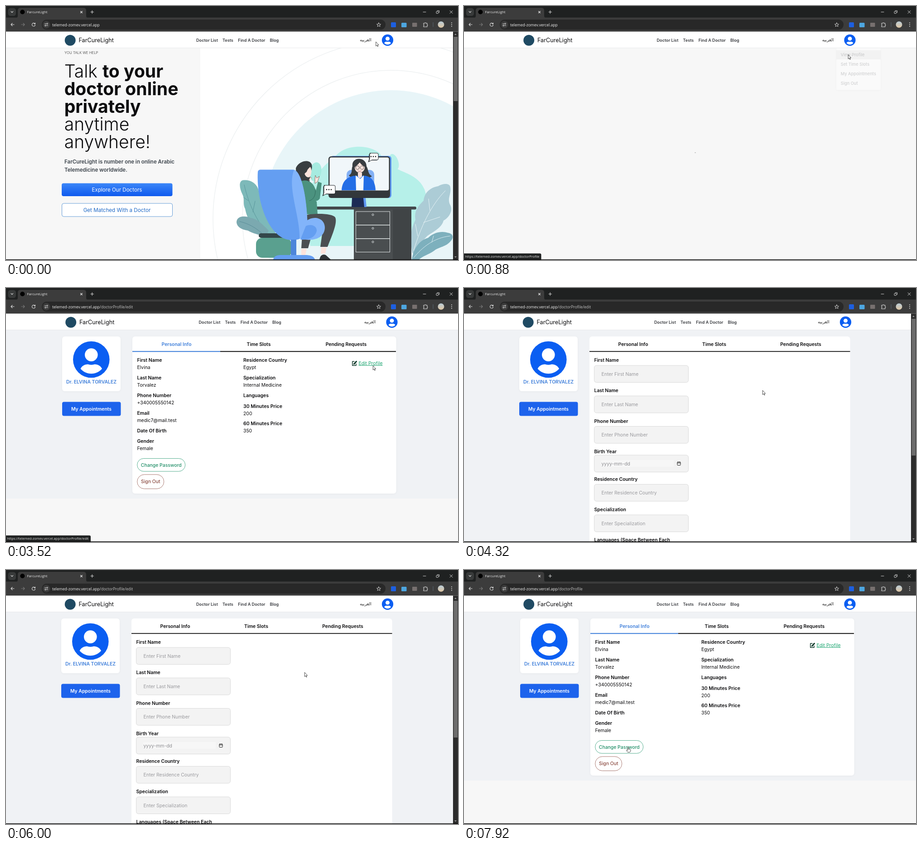
Recreate the animation shown at these times as an HTML page. Size 998x561 px, loop 8000 ms.

```html
<!DOCTYPE html>
<html lang="en">
<head>
<meta charset="utf-8">
<title>Telemedicine walkthrough</title>
<style>
  html, body { margin: 0; width: 100%; height: 100%; overflow: hidden; background: #f7f7f7; }
  svg { display: block; width: 100vw; height: 100vh; }
  text { font-family: Inter, sans-serif; white-space: pre; }
  .ui { font-family: "Open Sans", "Noto Sans", sans-serif; }
  .ar { font-family: "DejaVu Sans", sans-serif; }
</style>
</head>
<body>
<svg id="stage" viewBox="0 0 998 561" xmlns="http://www.w3.org/2000/svg"></svg>
<script>
const LOOP = 8000, STEP = 80;
const BRAND = 'FarCureLight', HOST = 'telemed-zomev.vercel.app';
const BLUE = '#0a5ef2', LINK = '#3f7fda', INK = '#0c0c0e';

const text = (x, y, size, str, weight = 400, fill = INK, extra = '') =>
  `<text x="${x}" y="${y}" font-size="${size}" font-weight="${weight}" fill="${fill}" ${extra}>${str}</text>`;
const mid = (x, y, size, str, weight, fill) => text(x, y, size, str, weight, fill, 'text-anchor="middle"');
const rect = (x, y, w, h, fill, rx = 0, extra = '') =>
  `<rect x="${x}" y="${y}" width="${w}" height="${h}" rx="${rx}" fill="${fill}" ${extra}/>`;
const circle = (x, y, r, fill, extra = '') => `<circle cx="${x}" cy="${y}" r="${r}" fill="${fill}" ${extra}/>`;
const path = (d, fill, extra = '') => `<path d="${d}" fill="${fill}" ${extra}/>`;
const line = (d, stroke, width = 1, extra = '') =>
  path(d, 'none', `stroke="${stroke}" stroke-width="${width}" stroke-linecap="round" stroke-linejoin="round" ${extra}`);
const group = (id, body) => `<g id="${id}">${body}</g>`;

const person = (x, y, r) => `<g transform="translate(${x} ${y}) scale(${r / 248})">
  ${circle(0, 0, 248, BLUE)}${circle(0, -64, 88, '#fff')}
  ${path('M0 192C-59 192-111 165-146 124C-128 88-91 64-48 64C-33 64-24 72 0 72S33 64 48 64C91 64 128 88 146 124C111 165 59 192 0 192Z', '#fff')}</g>`;

function illustration() {
  const HAIR = '#393e41', SKIN = '#fbe3dc', SEAT = '#649ef1', SEAT_LIGHT = '#82b4fa';
  const ring = r => circle(850, 470, r, 'none', 'stroke="#eef1f2" stroke-width="1.5"');
  const leaf = (d, vein, fill, stroke) => path(d, fill) + line(vein, stroke, 1);
  const bubble = (x, y, w, h) => {
    const shape = `M${x + 3} ${y}h${w - 6}q3 0 3 3v${h - 6}q0 3-3 3h-${w - 11}l-7 4 2-6v-${h - 4}q0-1 2-1z`;
    return path(shape, '#1e2226', 'transform="translate(-1.5 1)"') + path(shape, '#fff', 'stroke="#1e2226"') +
      [-5, 0, 5].map(d => circle(x + w / 2 + d, y + h / 2, 1.3, '#111')).join('');
  };
  const drawers = [0, 1, 2].map(i =>
    rect(772.5, 454 + i * 30, 75, 29.5, 'none', 0, 'stroke="#dfe5e6"') +
    circle(810, 461 + i * 30, 2, 'none', 'stroke="#dfe5e6"')).join('');
  return [
    ring(393), ring(328), circle(850, 470, 284, '#e8f5f8'),
    path('M672 530C650 450 665 375 725 335C745 305 800 304 825 325C850 372 905 360 924 405C940 455 930 505 912 530Z', '#b6f0e9'),
    '<ellipse cx="857" cy="344" rx="9" ry="18" fill="#b6f0e9" transform="rotate(-20 857 344)"/>',
    '<ellipse cx="683" cy="366" rx="13" ry="21" fill="#a6ebe0" transform="rotate(12 683 366)"/>',
    // plants
    leaf('M570 510C545 490 532 470 528 448C522 436 528 428 522 416C515 402 514 388 522 385C540 382 555 393 558 408C568 420 580 450 596 470L594 512Z',
      'M526 395C536 440 555 475 575 500M535 430l-10-7M545 455l5-24', '#7db9b9', '#5a979c'),
    leaf('M509 478C509 464 526 462 540 468C555 470 566 482 580 496L574 508C558 506 545 502 534 496C520 494 510 488 509 478Z',
      'M516 476C535 480 552 490 566 503', '#7ba9b0', '#5a8d98'),
    leaf('M897 545C890 505 896 490 904 472C900 452 912 440 922 430C924 410 940 400 954 398C966 391 980 391 981 400C984 414 974 424 980 438C988 450 980 466 966 474C962 490 944 498 930 508C918 520 908 535 900 548Z',
      'M970 408C938 440 915 490 900 540M936 452l-3-26M922 478l36-12M909 508l-5-26', '#acccd6', '#e6f3f6'),
    leaf('M896 560C900 535 912 518 932 512C944 500 962 496 976 501C988 503 989 512 982 519C972 532 956 532 946 540C932 550 920 552 912 560Z',
      'M980 508C945 512 920 532 900 556M940 522l4-14', '#7db0bd', '#d9ebf0'),
    // desk
    rect(768, 449, 127, 111, '#4a4e50'), rect(854, 449, 41, 111, '#404446'), drawers,
    rect(655, 443, 251, 6.5, '#42474a', 3),
    // monitor
    rect(716, 331, 135, 93, '#5d96f2', 6), path('M764 424h29l2 20h-32z', '#1c2b54'), path('M789 424h5l2 20h-5z', '#5d96f2'),
    rect(712, 332, 136, 92, '#33383b', 6), rect(714.5, 334.5, 131, 73, '#f1f7fa', 4),
    rect(752, 362, 61, 45, '#83b0f4', 10),
    path('M765 354C762 332 796 332 796 354C801 362 798 370 808 376C798 384 762 383 757 374C766 370 762 360 765 354Z', HAIR),
    circle(781, 357, 11, SKIN), path('M769 357C768 341 793 341 793 356C788 353 783 349 781 345C778 350 773 353 769 357Z', HAIR),
    line('M772 357a4 4 0 1 0 8 0a4 4 0 1 0-8 0M782 357a4 4 0 1 0 8 0a4 4 0 1 0-8 0', HAIR, .8),
    line('M777 364q4 3 7 0', '#b06a68'),
    path('M741 407C742 386 754 378 768 375L794 375C808 378 815 388 816 407Z', '#246ee6'),
    path('M772 374L782 382L790 374L789 407L773 407Z', '#f6faff'), path('M777 368h9v9l-5 4-4-4z', SKIN),
    // patient
    path('M640 358C645 343 670 336 675 350C678 362 670 368 671 380C670 400 660 415 648 412C652 396 640 380 640 358Z', HAIR),
    path('M664 354C674 350 677 364 672 376C668 382 658 376 659 366Z', SKIN),
    path('M650 357C655 347 673 343 675 351C671 358 667 357 664 366L653 376Z', HAIR),
    path('M668 386l4-9 3 4M682 382l1-8 3 6 6-4-4 12-6 4z', SKIN, 'stroke="#6b4a45" stroke-width=".7"'),
    path('M648 388C666 380 680 390 684 408L689 388L697 391L693 425C688 433 681 429 686 432L688 460H655Z', '#4b927f'),
    line('M683 405C684 420 678 428 670 430', '#316b5d'),
    path('M645 470C650 457 720 455 727 467C733 480 716 515 710 532H694L701 483L680 488L667 535H652L655 490Z', '#4b4f52'),
    path('M652 536h12l-3 14h-9zM696 533h12l-3 14h-10z', SKIN), path('M645 560q4-12 20-8l5 8zM692 560q3-14 14-10l11 10z', '#303538'),
    // chair
    rect(558, 502, 72, 10, '#34474a', 5), rect(552, 512, 78, 44, '#5aa08f', 14),
    path('M556 366Q557 361 563 361.5H634C652 362 664 420 666 485C668 510 650 517 630 517C580 516 552 430 556 366Z', SEAT),
    path('M636 362C653 366 665 425 666 490C665 505 657 513 648 514C650 465 620 400 636 362Z', SEAT_LIGHT),
    path('M664 474C680 462 704 468 704 490C703 512 680 520 655 515Z', SEAT_LIGHT),
    path('M662 486C674 480 687 486 686 497C682 512 668 517 650 516Z', SEAT),
    rect(629, 516, 12, 36, '#4c85da'), path('M590 560Q592 550 606 550H664Q680 551 682 560Z', SEAT),
    bubble(800, 325, 22, 15), bubble(699, 396, 28, 19)
  ].join('');
}

function home() {
  const headline = [['Talk <tspan font-weight="700">to your</tspan>', 300], ['doctor online', 700],
    ['privately', 700], ['anytime', 300], ['anywhere!', 300]];
  return rect(0, 93, 429, 468, '#f7f7f7') + rect(429, 93, 558, 468, '#fff') + illustration() +
    text(129, 106, 7.85, 'YOU TALK WE HELP', 300, '#333') +
    headline.map(([str, weight], i) => text(128.7, 158 + i * 39, 39.1, str, weight)).join('') +
    text(129, 348, 11.5, BRAND + ' is number one in online Arabic', 600, '#3b434b') +
    text(129, 366.3, 11.5, 'Telemedicine worldwide.', 600, '#3b434b') +
    rect(123, 391.5, 244.5, 28.5, 'url(#btn)', 4) + mid(245, 410, 11.6, 'Explore Our Doctors', 400, '#fff') +
    rect(123.5, 436, 244, 29, '#fff', 4, 'stroke="#3f86cf" stroke-width=".8"') +
    mid(245, 455, 11.6, 'Get Matched With a Doctor', 400, '#1f69c6');
}

const sideCards = x =>
  rect(x, 107, 129, 121, '#fff', 6, 'filter="url(#soft)"') + person(x + 64.3, 158, 40.3) +
  mid(x + 64.5, 211, 10.4, 'Dr. ELVINA TORVALEZ', 600, LINK) +
  rect(x, 251.5, 129.5, 31, '#1d63ec', 4) + mid(x + 64.5, 270.8, 10.4, 'My Appointments', 600, '#fff');

const tabs = (centers, firstColor) => ['Personal Info', 'Time Slots', 'Pending Requests']
  .map((s, i) => mid(centers[i], 128, 10.4, s, 600, i ? INK : firstColor)).join('');

function profile() {
  const field = (x, y, label, value) => text(x, y, 10.5, label, 600) + (value ? text(x, y + 16, 10.4, value) : '');
  const left = [[163, 'First Name', 'Elvina'], [202, 'Last Name', 'Torvalez'], [241, 'Phone Number', '+340005550142'],
    [280, 'Email', 'medic7@mail.test'], [319, 'Date Of Birth'], [342.3, 'Gender', 'Female']];
  const right = [[163, 'Residence Country', 'Egypt'], [202, 'Specialization', 'Internal Medicine'], [241, 'Languages'],
    [264.5, '30 Minutes Price', '200'], [303.3, '60 Minutes Price', '350']];
  return rect(0, 93, 998, 372, '#f0f2f5') + sideCards(124) + rect(279, 107, 582.5, 347, '#fff', 6, 'filter="url(#soft)"') +
    tabs([376.5, 558, 751], LINK) + rect(279, 139.2, 194, 2, LINK) + rect(473, 139.2, 388, 2, '#151515') +
    left.map(f => field(289.5, ...f)).join('') + right.map(f => field(524, ...f)).join('') +
    rect(289.7, 376.5, 106, 28.5, '#fff', 14.2, 'stroke="#2d9b74" stroke-width=".8"') + mid(342.8, 394.7, 10.4, 'Change Password', 500, '#218f68') +
    rect(289.7, 412, 59, 31.5, '#fff', 15.7, 'stroke="#955a50" stroke-width=".8"') + mid(319.2, 431.4, 10.4, 'Sign Out', 500, '#8b4a40') +
    line('M769 162.300H764.800V171.300H773V167.500', '#143d2e', 1.5) + line('M768.300 168L773.500 162.300', '#143d2e', 3) +
    text(778.5, 169.5, 10.4, 'Edit Profile', 400, '#1ea672', 'text-decoration="underline"');
}

function form() {
  const input = (y, hint) => rect(287.5, y, 208, 37.5, '#f3f3f3', 5, 'stroke="#dadada"') +
    text(303.5, y + 22.5, 10.4, hint, 400, '#9a9a9e', 'clip-path="url(#field)"');
  const label = (y, str) => text(287.5, y, 10.4, str, 600);
  const row = (labelY, boxY, str) => label(labelY, str) + input(boxY, 'Enter ' + str);
  return rect(277, 107, 575.5, 750, '#fff', 6) + sideCards(122) + tabs([373.5, 552.5, 743.5], INK) + rect(277, 139.3, 575.5, 1.8, '#151515') +
    row(163, 171, 'First Name') + row(230, 238.3, 'Last Name') + row(297.7, 305.5, 'Phone Number') +
    label(364.7, 'Birth Year') + input(369, '') + rect(303, 380, 160, 15, '#f7f7f7') +
    text(303.5, 391.5, 10.4, 'yyyy-mm-dd', 400, '#8e8e92') +
    rect(471, 384.5, 7, 7, 'none', 1, 'stroke="#222"') + line('M471 386.500h7M472.500 383.500v1M476.500 383.500v1', '#222', 1.2) +
    row(425.5, 433.5, 'Residence Country') + row(493, 501, 'Specialization') +
    label(560, 'Languages (Space Between Each') + label(575.7, 'Language)') +
    input(584, 'Enter Languages (Space Between E') +
    row(643.3, 651, '30 Minutes Price') + row(710.5, 718.5, '60 Minutes Price');
}

function header() {
  const nav = [[0, 'Doctor List'], [58, 'Tests'], [92.3, 'Find A Doctor'], [162.5, 'Blog']];
  return rect(0, 56, 998, 37, '#fff') + rect(0, 92.3, 998, .8, '#e3e4e6') +
    group('brand', circle(12, 75.8, 12, '#1f4a63') + text(30.7, 80.3, 12.7, BRAND)) +
    group('nav', nav.map(([x, s]) => text(x, 79.2, 9.15, s, 600, '#3a3c40')).join('')) +
    group('account', text(-48.5, 78, 9.4, 'العربيه', 400, '#222', 'class="ar" text-anchor="middle"') + person(0, 75.4, 12.6));
}

function menu() {
  const items = ['View Profile', 'Set Time Slots', 'My Appointments', 'Sign Out'];
  return rect(0, 93, 98, 92.5, '#fbfbfb', 2, 'filter="url(#soft)"') + rect(0, 97.5, 98, 20.5, '#ececec', 0, 'opacity=".6"') +
    group('menuText', items.map((s, i) => text(9.7, 111 + i * 21, 9.25, s, 500, '#33363b')).join(''));
}

function browser() {
  const icon = (d, color = '#dcdcdc', w = 1.1) => line(d, color, w);
  const tip = (y, s) => path(`M990 ${y}h5l-2.5 ${s * 3}z`, '#9a9a9a');
  return rect(0, 0, 998, 26, '#1f2121') + rect(0, 25.5, 998, 31, '#3c3c3c') +
    rect(4.5, 4.5, 17.5, 17.5, '#383a3a', 5.5) + icon('M11 12l2.300 2.300L15.600 12') +
    path('M22 26C25 26 26 24 26 21V10Q26 4 32 4H171Q177 4 177 10V21C177 24 178 26 181 26Z', '#3c3c3c') +
    circle(36.3, 13.3, 5, '#000') + text(46.5, 16.2, 7.8, 'FarcureLight', 400, '#e8e8e8', 'class="ui"') +
    icon('M164.500 11.500l4 4m0-4l-4 4M187 13.300h6.500M190.200 10v6.500') +
    icon('M921 13.300h6M980 10.300l6 6m0-6l-6 6', '#e6e6e6', .9) +
    rect(950, 12, 4.5, 4.5, 'none', 1, 'stroke="#e6e6e6" stroke-width=".9"') + icon('M952 10.300h4.500v4.500', '#e6e6e6', .9) +
    icon('M18 41h-7m3-3l-3 3 3 3') + icon('M34 41h7m-3-3l3 3-3 3', '#777') +
    icon('M64 39.200a3.600 3.600 0 1 0 .5 2.800M64.500 37.300v2.300h-2.300') +
    rect(79, 30, 759, 22.5, '#282828', 11.2) + circle(89.2, 41.2, 8.2, '#3c3c3c') +
    icon('M85.500 39.200h3M92.500 43.200h-3') + circle(91, 39.2, 1.3, 'none', 'stroke="#dcdcdc"') + circle(87, 43.2, 1.3, 'none', 'stroke="#dcdcdc"') +
    text(102, 44.6, 8.58, HOST + '<tspan id="urlPath" fill="#c4c4c4"></tspan>', 400, '#f0f0f0', 'class="ui"') +
    icon('M823 37l1.300 3 3.200.2-2.500 2 .9 3.200-2.900-1.800-2.900 1.800.9-3.200-2.500-2 3.200-.2z', '#dcdcdc', .9) +
    rect(850, 36, 11, 11, '#1d5fe0', 1.5) + rect(873, 37, 11.5, 10, '#4da6e0', 1.5) + rect(897, 37, 10.5, 9, '#77706f', 1) +
    icon('M922 38h2.500a1.600 1.600 0 0 1 3 0h2.300v2.700a1.500 1.500 0 0 1 0 2.900v2.400h-7.800v-2.500a1.500 1.500 0 0 0 0-2.800z') +
    rect(942.5, 36, 1, 10, '#5b6670') + circle(960.5, 41, 7, 'url(#avatar)') +
    [37.3, 41.2, 45].map(y => circle(984, y, 1, '#dcdcdc')).join('') +
    group('scrollbar', rect(987, 56.5, 11, 504, '#2c2c2c') + tip(64, -1) + tip(553, 1) + '<rect id="thumb" x="988.5" width="8.5" fill="#6d6d6d"/>') +
    group('status', '<path id="statusBox" fill="#202222"/><text id="statusText" class="ui" x="2.5" y="556.3" font-size="7.45" fill="#e4e4e4"></text>') +
    rect(0, 559.6, 998, 1.4, '#0a0a0a');
}

const outline = 'stroke="#222" stroke-width=".8"';
const arrow = path('M0 0V9.500L2.200 7.500L3.700 10.800L5 10.200L3.600 7H6.300Z', '#fff', outline);
const hand = path('M-1.500 1Q-1.500-.5-.5-.5Q.5-.5.5 1V4.500Q2.200 3.800 2.500 4.800Q4 4.200 4.300 5.300Q5 5 5 6C5 9 4 10.500 3 11H-1.500C-2.500 9.500-4.500 7.500-4.200 6.300Q-3.300 5.200-1.500 6.800Z', '#fff', outline);

document.getElementById('stage').innerHTML = `<defs>
  <linearGradient id="btn" x2="0" y2="1"><stop stop-color="#3b86f8"/><stop offset="1" stop-color="#0f5aee"/></linearGradient>
  <linearGradient id="avatar" x2="0" y2="1"><stop stop-color="#b9cbd6"/><stop offset="1" stop-color="#e0c7a4"/></linearGradient>
  <filter id="soft" x="-10%" y="-10%" width="120%" height="120%"><feDropShadow dx="0" dy="1" stdDeviation="2" flood-opacity=".04"/></filter>
  <clipPath id="field"><rect x="290" y="160" width="189.5" height="700"/></clipPath></defs>` +
  rect(0, 56, 998, 505, '#f7f7f7') +
  group('home', home()) + group('loading', '<rect id="dot"/>') + group('profile', profile()) +
  group('form', rect(0, 93, 998, 468, '#f0f2f5') + group('formBody', form())) +
  header() + group('menu', menu()) + browser() +
  group('cursor', group('arrow', arrow) + group('hand', hand));

const el = {};
document.querySelectorAll('[id]').forEach(node => el[node.id] = node);
const show = (id, on) => el[id].setAttribute('display', on ? 'inline' : 'none');
const move = (id, x, y = 0) => el[id].setAttribute('transform', `translate(${x} ${y})`);
const attrs = (id, values) => Object.entries(values).forEach(([k, v]) => el[id].setAttribute(k, v));

// Value active at time t in a list of [start, value]
const at = (list, t) => list.reduce((found, [start, value]) => t >= start ? value : found, list[0][1]);
// Eased interpolation through [time, ...values] keys
function tween(keys, t) {
  const i = keys.findIndex(k => k[0] > t);
  if (i < 0) return keys[keys.length - 1].slice(1);
  if (i === 0) return keys[0].slice(1);
  const [a, b] = [keys[i - 1], keys[i]];
  const p = (t - a[0]) / (b[0] - a[0]), e = p * p * (3 - 2 * p);
  return a.slice(1).map((v, n) => v + (b[n + 1] - v) * e);
}

const PROFILE = '/doctorProfile', EDIT = PROFILE + '/edit';
const scenes = [[0, 'home'], [800, 'loading'], [2240, 'profile'], [3680, 'form'], [7280, 'profile']];
const urls = [[0, ''], [1040, PROFILE], [3440, EDIT], [7200, PROFILE]];
const statuses = [[0, ''], [480, PROFILE], [1040, ''], [3200, EDIT], [3760, ''], [6960, PROFILE], [7600, '']];
const pointers = [[0, 'arrow'], [6960, 'hand'], [7360, 'arrow'], [7760, 'hand']];
const cursorKeys = [[0, 816.7, 79], [240, 842, 78], [320, 842, 78], [640, 848.3, 107.5], [960, 848.3, 107.5], [1680, 587, 197],
  [2720, 587, 197], [3360, 810.3, 171.5], [3600, 810.3, 171.5], [4160, 659.3, 226], [6640, 659.3, 226],
  [6960, 371, 122], [7200, 371, 122], [7440, 396, 188], [7560, 396, 188], [7840, 363, 391.5]];
const scrollKeys = [[4400, 0], [4640, 208], [4720, 208], [5120, 97], [5600, 0]];
const menuKeys = [[160, 0], [320, 1], [720, 1], [1040, 0]];

function render(t) {
  const scene = at(scenes, t), narrow = scene === 'home' || scene === 'form';
  for (const id of ['home', 'loading', 'profile', 'form']) show(id, id === scene);

  move('brand', narrow ? 129.7 : 131.2);
  move('nav', narrow ? 420 : 425.5);
  move('account', narrow ? 842.5 : 852);

  const early = t < 960;
  attrs('dot', { x: 509.3, y: early ? 323.4 : 317.8, width: 2.6, height: early ? 1 : 2.4, rx: early ? 0 : 1.2, fill: early ? '#999' : '#2b80d8' });

  const [opacity] = tween(menuKeys, t), closing = t > 720;
  show('menu', opacity > 0);
  move('menu', narrow ? 812.5 : 822);
  attrs('menu', { opacity: closing ? Math.min(1, opacity * 1.6) : opacity });
  attrs('menuText', { opacity: closing ? opacity * .5 : 1 });

  const [scroll] = tween(scrollKeys, t);
  move('formBody', 0, -scroll);
  show('scrollbar', narrow);
  attrs('thumb', scene === 'home' ? { y: 68, height: 142 } : { y: 68 + scroll * .59, height: 302 });

  el.urlPath.textContent = at(urls, t);
  const status = at(statuses, t);
  show('status', status);
  el.statusText.textContent = `https://${HOST}${status}`;
  attrs('statusBox', { d: `M0 546.5H${status === EDIT ? 184 : 167.5}q3 0 3 3V560H0Z` });

  const pointer = at(pointers, t);
  show('arrow', pointer === 'arrow');
  show('hand', pointer === 'hand');
  move('cursor', ...tween(cursorKeys, t));
}

const start = performance.now();
function frame(now) {
  const t = Math.max(0, now - start) % LOOP;
  render(Math.floor(t / STEP) * STEP);
  requestAnimationFrame(frame);
}
render(0);
requestAnimationFrame(frame);
</script>
</body>
</html>
```
